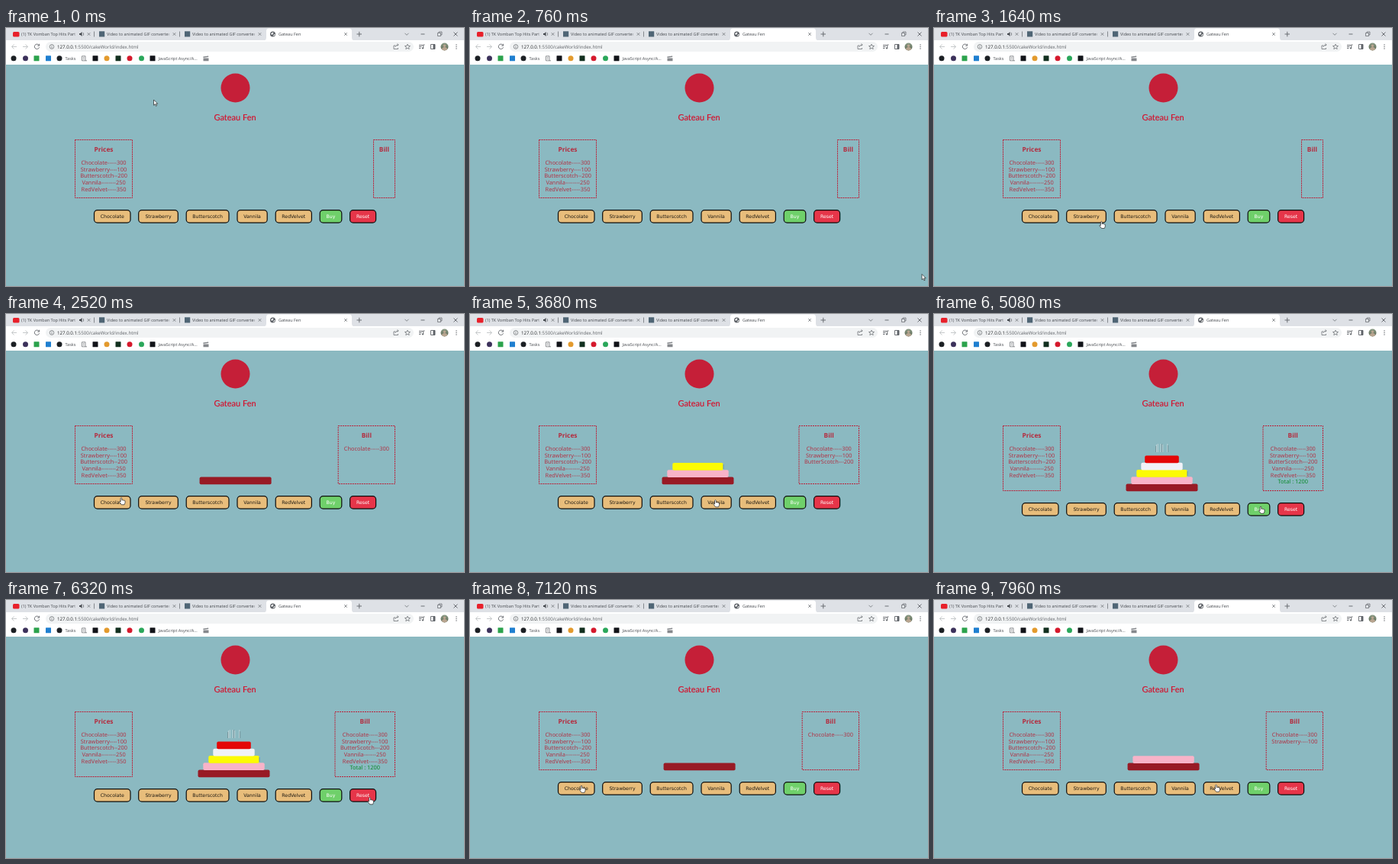
An HTML page that plays this animation: 600x338 px, repeating every 8000 ms.

```html
<!DOCTYPE html>
<html lang="en">
<head>
<meta charset="utf-8">
<title>Gateau Fen</title>
<style>
html, body { margin: 0; width: 100%; height: 100%; overflow: hidden; background: #8bb9c1; }
svg { display: block; width: 100%; height: 100%; }
text { font-family: "Open Sans", sans-serif; text-rendering: geometricPrecision; }
.tab { font-size: 5.5px; fill: #45494e; }
.line { fill: none; stroke: #5f6368; stroke-width: .9; }
.thin { stroke-width: .7; }
.faint { stroke: #c0c3c6; }
.shop text { text-anchor: middle; font-family: "Noto Sans", sans-serif; font-size: 7.4px; fill: #b03446; }
.shop .head { font-size: 8.4px; font-weight: 600; fill: #b52b3e; }
.shop .name { font-family: Lato, sans-serif; font-size: 11px; fill: #d5102c; stroke: #d5102c; stroke-width: .15; }
.shop .label { font-family: "DejaVu Sans", sans-serif; font-size: 6.2px; fill: #1c1812; }
.shop .light { fill: #fff; }
.shop .total { fill: #0c8a2c; }
.frame { fill: none; stroke: #bd1c35; stroke-width: 1; stroke-dasharray: 2 1; }
.button { stroke: #0c0c0c; stroke-width: 1.2; }
.pointer { fill: #fff; stroke: #222; stroke-width: .7; stroke-linejoin: round; }
</style>
</head>
<body>
<svg viewBox="0 0 600 338" preserveAspectRatio="none">
  <defs>
    <linearGradient id="photo" x2="0" y2="1">
      <stop stop-color="#8d9d88"/><stop offset="1" stop-color="#55634e"/>
    </linearGradient>
    <clipPath id="cut1"><rect x="18" width="72.5" height="16"/></clipPath>
    <clipPath id="cut2"><rect x="130" width="83.5" height="16"/></clipPath>
    <clipPath id="cut3"><rect x="242" width="83.5" height="16"/></clipPath>
  </defs>

  <g id="browser">
    <rect width="600" height="17" fill="#dee1e6"/>
    <rect y="16" width="600" height="32" fill="#fff"/>
    <path d="M337 16.5q4 0 4-4V4q0-3.5 3.5-3.5h105q3.5 0 3.5 3.5v8.5q0 4 4 4z" fill="#fff"/>
    <rect x="52" y="18" width="482" height="13" rx="6.5" fill="#f1f3f4"/>
    <rect x="9" y="5" width="8.5" height="6.5" rx="1.5" fill="#e8202a"/>
    <text class="tab" x="20" y="10.2" clip-path="url(#cut1)">(1) TK Vomban Top Hits Party</text>
    <text class="tab" x="132" y="10.2" clip-path="url(#cut2)">Video to animated GIF converter</text>
    <text class="tab" x="244" y="10.2" clip-path="url(#cut3)">Video to animated GIF converter</text>
    <text class="tab" x="357" y="10.2">Gateau Fen</text>
    <rect x="122" y="4.3" width="7.2" height="7.2" fill="#4f6575"/>
    <rect x="234" y="4.3" width="7.2" height="7.2" fill="#4f6575"/>
    <circle cx="349.5" cy="8" r="3.5" fill="#5f6368"/>
    <path d="M347 7.5q2-2.500 3.500-1.500l-1 2-1 1zM350 10l1.500-2 1 .5q-.5 1.500-2 2z" fill="#fff"/>
    <path d="M96 7h1.500L99.500 5v6L97.500 9H96z" fill="#45494e"/>
    <path class="line thin" d="M101 6q1.500 2 0 4M115.500 4.500v7M227.500 4.500v7"/>
    <path class="line thin" id="closers"/>
    <path class="line" d="M459.500 8h6.500M462.800 4.800v6.500M543.500 8h5M586.500 5.500l5 5m0-5l-5 5"/>
    <path class="line thin" d="M497.500 6.800l2.500 2.500 2.500-2.500" transform="translate(25)"/>
    <path class="line thin" d="M565.500 6.500h4v4h-4zM567 6.500V5h4v4h-1.500"/>
    <path class="line faint" d="M14 24.500H7.500M10.500 21.500l-3 3 3 3M22 24.500h6.500M25.500 21.500l3 3-3 3"/>
    <path class="line" d="M43 22.300a3.200 3.200 0 1 0 .6 3M43.700 20.800v2.400h-2.400"/>
    <circle class="line thin" cx="60" cy="24.500" r="2.800"/>
    <path class="line thin" d="M60 24v2.200M60 22.600v.7"/>
    <text x="67" y="26.600" font-size="6.150" fill="#5f6368"><tspan fill="#25282b">127.0.0.1</tspan>:5500/cakeWorld/index.html</text>
    <path class="line thin" d="M510 23h-2v4.500h5.500V26M510 25q0-3 4-3M512.500 20.500l1.700 1.500-1.700 1.500M526 21.200l1 2.200 2.500.2-1.900 1.600.6 2.400-2.200-1.300-2.200 1.300.6-2.400-1.900-1.600 2.500-.2z"/>
    <path class="line" d="M541 22.500h5M541 24.500h3.500M541 26.500h2.500M546.700 26.500v-4.500h1.800M556.500 21.500h5.500v6h-5.500z"/>
    <circle cx="546" cy="26.500" r="1.100" fill="#5f6368"/>
    <rect x="559.500" y="21.500" width="2.500" height="6" fill="#5f6368"/>
    <circle cx="574.500" cy="24.500" r="5" fill="url(#photo)"/>
    <path d="M571 28q0-3 3.500-3t3.500 3a5 5 0 0 1-7 0z" fill="#b9a590"/>
    <circle cx="574.500" cy="23.300" r="1.700" fill="#b9a590"/>
    <g fill="#5f6368"><circle cx="590" cy="22" r=".7"/><circle cx="590" cy="24.500" r=".7"/><circle cx="590" cy="27" r=".7"/></g>
    <g id="marks"></g>
    <path class="line thin" d="M99.500 36.800h4.500v6h-4.500zM101 38.500h1.500M101 40.500h1.500M104 42.800h2"/>
    <path d="M258.500 39.500h7v3.700h-7zM258.300 37.500l6.800-1 .2 1.500-6.800 1z" fill="#85888c"/>
    <text class="tab" x="77.500" y="42">Tasks</text>
    <text class="tab" x="199.500" y="42">JavaScript Async/A...</text>
  </g>

  <g class="shop">
    <circle cx="300.500" cy="78.500" r="19" fill="#c51f38"/>
    <text class="name" x="300" y="120.800">Gateau Fen</text>
    <rect class="frame" id="priceFrame" x="90.500" y="146.500" width="75"/>
    <text class="head" x="128" y="162">Prices</text>
    <g id="prices"></g>
    <rect class="frame" id="billFrame" y="146.500"/>
    <text class="head" id="billHead" y="162">Bill</text>
    <g id="bill"></g>
    <g id="cake"></g>
    <g id="buttons"></g>
  </g>

  <g id="cursor">
    <path class="pointer" id="arrow" d="M0 0v7.200l1.700-1.500 1.200 2.600 1.200-.6-1.200-2.500h2.300z"/>
    <path class="pointer" id="hand" d="M-.9.800q.9-1.400 1.800 0v2.700q.9-.7 1.500.1 1-.5 1.500.3 1.100-.3 1.100.8v2.200L4 9.300H.2L-2.500 5.800q.1-1.300 1.600-.3z"/>
  </g>
</svg>

<script>
const LOOP = 8000;
const $ = id => document.getElementById(id);

function add(parent, tag, attrs, text = "") {
  const node = document.createElementNS("http://www.w3.org/2000/svg", tag);
  for (const key in attrs) node.setAttribute(key, attrs[key]);
  node.textContent = text;
  parent.append(node);
  return node;
}
const show = (node, on) => node.setAttribute("visibility", on ? "visible" : "hidden");
const lineY = i => 178.8 + i * 8.75;

$("closers").setAttribute("d",
  [108.5, 220.5, 332.5, 445].map(x => `M${x - 1.8} 6.2l3.6 3.6m0-3.6l-3.6 3.6`).join(""));

// Bookmark marks: centre x, colour, round or square
[[10, "#1b1f23", 1], [25.5, "#3c315b", 1], [40, "#2ba24c"], [55.5, "#1f7fd0"],
 [70, "#1b1f23", 1], [117, "#111318"], [132, "#e39a2d", 1], [147, "#12301f"],
 [162, "#d5192c", 1], [177.5, "#2aa75a", 1], [192, "#111318"]].forEach(([x, fill, round]) =>
  add($("marks"), "rect", { x: x - 3.5, y: 36.2, width: 7, height: 7, rx: round ? 3.5 : .5, fill }));

["Chocolate-----300", "Strawberry----100", "Butterscotch--200", "Vannila--------250", "RedVelvet-----350"]
  .forEach((line, i) => add($("prices"), "text", { x: 128, y: lineY(i) }, line));

const billLines = ["Chocolate-----300", "Strawberry----100", "ButterScotch---200", "Vannila-------250", "RedVelvet-----350"]
  .map((line, i) => add($("bill"), "text", { y: lineY(i) }, line));
const total = add($("bill"), "text", { y: lineY(5) - .3, class: "total" }, "Total : 1200");

// Cake tiers from the bottom up: half width, colour
const tiers = [[47, "#981a25"], [40.2, "#f8b3c8"], [33.2, "#fcfb04"], [27.2, "#f1f2f8"], [22.3, "#e40707"]]
  .map(([half, fill], i) => {
    const tier = add($("cake"), "g", {});
    add(tier, "rect", { x: -half, y: 213.6 - i * 9.25, width: half * 2, height: 9.6, rx: 2, fill });
    if (i === 2) add(tier, "path", { d: "M33.5 197v6", stroke: "#4a7fc0", "stroke-width": .7 });
    return tier;
  });
const candles = add($("cake"), "g", { fill: "none", "stroke-width": .7 });
add(candles, "path", { d: "M-7 162v10M-5.2 161v11M-1.5 161v11M1.2 162v10M7.2 161v11", stroke: "#d3dde0" });
add(candles, "path", { d: "M-8 164v8M0 161v11M8.2 163v9", stroke: "#6d878e" });

const buttons = [["Chocolate", 115.5, 47.5], ["Strawberry", 173.7, 51.6], ["Butterscotch", 236.2, 55.8],
  ["Vannila", 303, 39.2], ["RedVelvet", 353.2, 47.2], ["Buy", 411.2, 28.6, "#6fd06a"], ["Reset", 450.6, 34, "#e63549"]];
for (const [label, x, width, fill] of buttons) {
  add($("buttons"), "rect", { class: "button", x, y: 238.7, width, height: 16.4, rx: 4.2, fill: fill || "#e8bd7b" });
  add($("buttons"), "text", { class: fill ? "label light" : "label", x: x + width / 2, y: 249.2 }, label);
}

// Clicks: time, tiers on the plate, paid
const clicks = [[0, 0], [2120, 1], [2840, 2], [3280, 3], [3800, 4], [4280, 5], [4880, 5, true],
  [6440, 0], [7120, 1], [7480, 2]];

// Pointer stops: time, x, y
const stops = [[0, 193.5, 94], [160, 193.5, 94], [680, 592, 322.5], [1040, 592, 322.5],
  [1840, 151, 240.5], [2560, 151, 240.5], [2760, 200, 243], [2920, 200, 243],
  [3180, 264, 244], [3340, 264, 244], [3620, 321.5, 243.5], [3860, 321.5, 243.5],
  [4180, 375, 243], [4360, 375, 243], [4720, 428, 252], [5240, 428, 252],
  [5900, 476.5, 258.5], [6360, 476.5, 258.5], [6500, 474, 252],
  [7020, 146, 243], [7160, 146, 243], [7400, 200, 243], [7540, 200, 243],
  [7900, 369.5, 242], [8000, 369.5, 242]];

function pointerAt(t) {
  const i = stops.findIndex(stop => stop[0] > t);
  const [t0, x0, y0] = stops[i - 1], [t1, x1, y1] = stops[i];
  const p = (t - t0) / (t1 - t0), eased = p * p * (3 - 2 * p);
  return [x0 + (x1 - x0) * eased, y0 + (y1 - y0) * eased];
}

function draw(t) {
  const [, count, paid] = clicks.filter(click => click[0] <= t).pop();
  const left = count === 0 ? 481.5 : count < 3 ? 435.2 : 431;
  const right = 509.5;
  const middle = (left + right) / 2;
  const drop = paid ? 9 : 0;

  $("priceFrame").setAttribute("height", 76 + drop);
  $("billFrame").setAttribute("height", 76 + drop);
  $("billFrame").setAttribute("x", left);
  $("billFrame").setAttribute("width", right - left);
  $("billHead").setAttribute("x", middle);
  billLines.forEach((line, i) => {
    line.setAttribute("x", middle);
    show(line, i < count);
  });
  total.setAttribute("x", middle);
  show(total, paid);
  tiers.forEach((tier, i) => show(tier, i < count));
  show(candles, paid);
  $("cake").setAttribute("transform", `translate(${(166 + left) / 2} ${drop})`);
  $("buttons").setAttribute("transform", `translate(0 ${drop})`);

  const [x, y] = pointerAt(t);
  const over = y > 238.5 + drop && y < 255.5 + drop &&
    buttons.some(([, bx, width]) => x >= bx && x <= bx + width);
  $("cursor").setAttribute("transform", `translate(${x} ${y})`);
  show($("hand"), over);
  show($("arrow"), !over);
}

const start = performance.now();
function tick() {
  draw((performance.now() - start) % LOOP);
  requestAnimationFrame(tick);
}
tick();
</script>
</body>
</html>
```
